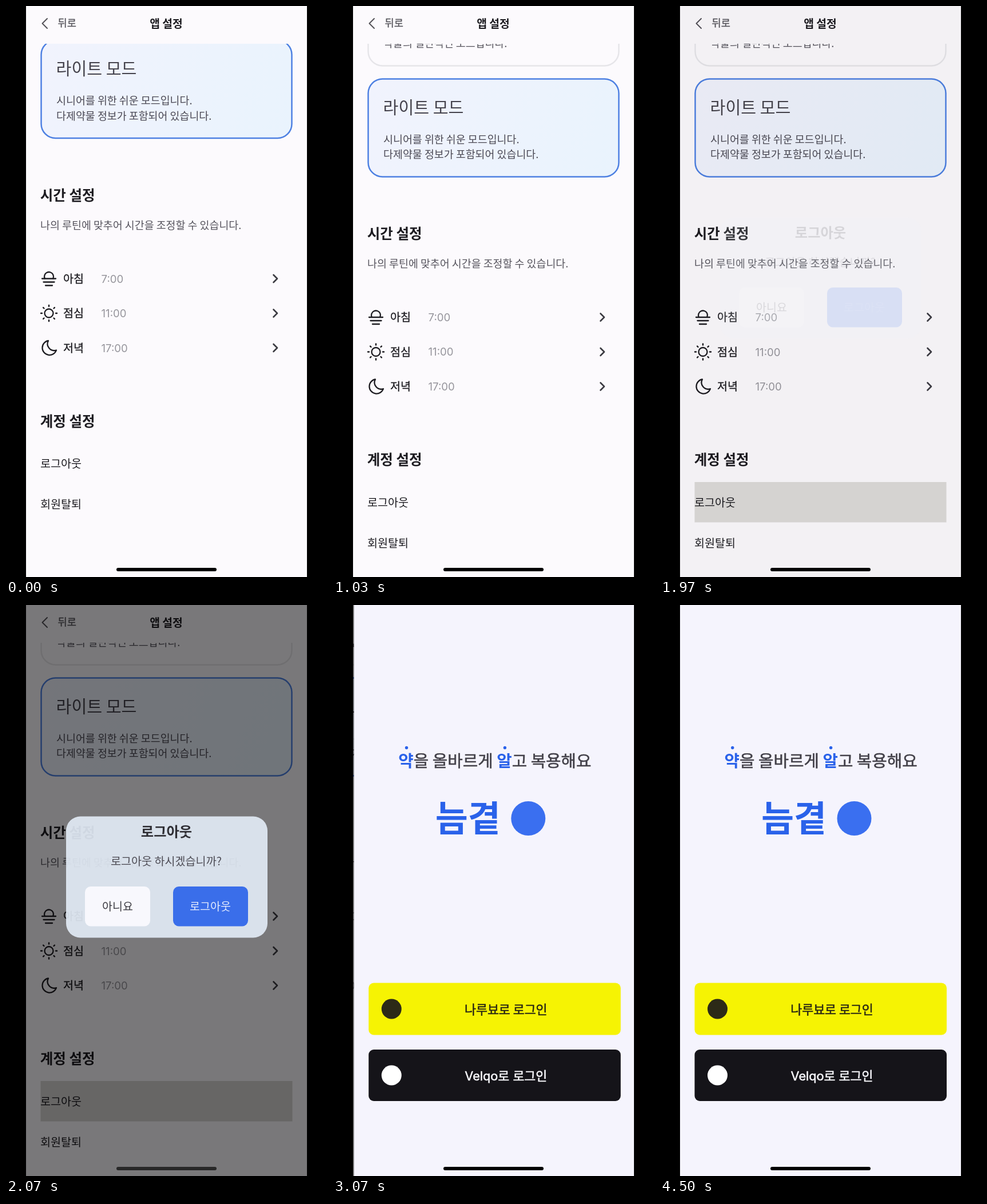
Write an HTML page with a canvas that moves like this. It is 561 by 998 pixels and loops after 5.06 s.

```html
<!DOCTYPE html>
<html lang="ko">
<head>
<meta charset="utf-8">
<title>앱 설정</title>
<style>
  html, body { margin: 0; width: 100%; height: 100%; overflow: hidden; background: #000; }
  canvas { display: block; width: 561px; height: 998px; }
</style>
</head>
<body>
<canvas id="stage"></canvas>
<script>
const W = 561, H = 998, LOOP = 5060;
const SCREEN = { x: 35, w: 491 };
const HEADER = 66;
const KO = '"Noto Sans CJK KR", "Noto Sans CJK", sans-serif';
const LATIN = 'Inter, ' + KO;
const INK = '#1d1c21', GREY = '#56545d', BLUE = '#2a62ea', PAPER = '#fcfafd';

const canvas = document.getElementById('stage');
const ctx = canvas.getContext('2d');
const ratio = window.devicePixelRatio || 1;
canvas.width = W * ratio;
canvas.height = H * ratio;

const clamp = v => Math.min(1, Math.max(0, v));
const span = (t, start, length) => clamp((t - start) / length);

// Cubic segment between two points, solved for y at a given x.
function bezierAt(x, p0, p1, p2, p3) {
  const at = (s, i) => {
    const r = 1 - s;
    return r * r * r * p0[i] + 3 * r * r * s * p1[i] + 3 * r * s * s * p2[i] + s * s * s * p3[i];
  };
  let lo = 0, hi = 1;
  for (let i = 0; i < 24; i++) {
    const mid = (lo + hi) / 2;
    if (at(mid, 0) < x) lo = mid; else hi = mid;
  }
  return at((lo + hi) / 2, 1);
}
const cubic = (a, b, c, d) => x =>
  x <= 0 ? 0 : x >= 1 ? 1 : bezierAt(x, [0, 0], [a, b], [c, d], [1, 1]);

const ease = cubic(0.25, 0.1, 0.25, 1);
const easeOut = cubic(0, 0, 0.58, 1);
const pushBack = cubic(0.35, 0.91, 0.33, 0.97);
function slideIn(x) {
  if (x <= 0 || x >= 1) return clamp(x);
  const mid = [0.198, 0.541];
  return x < mid[0]
    ? bezierAt(x, [0, 0], [0.056, 0.024], [0.108, 0.3085], mid)
    : bezierAt(x, mid, [0.3655, 1], [0.5465, 0.989], [1, 1]);
}

function box(x, y, w, h, r, fill, stroke, width) {
  ctx.beginPath();
  ctx.roundRect(x, y, w, h, r);
  if (fill) { ctx.fillStyle = fill; ctx.fill(); }
  if (stroke) { ctx.strokeStyle = stroke; ctx.lineWidth = width; ctx.stroke(); }
}

function disc(x, y, r, fill) {
  ctx.beginPath();
  ctx.arc(x, y, r, 0, Math.PI * 2);
  ctx.fillStyle = fill;
  ctx.fill();
}

function line(points, color, width) {
  ctx.beginPath();
  points.forEach(([x, y]) => ctx.lineTo(x, y));
  ctx.strokeStyle = color;
  ctx.lineWidth = width;
  ctx.stroke();
}

// y is the middle of the letters; extra thickens the strokes a little.
function text(str, x, y, size, color, { weight = 400, align = 'left', extra = 0, font = KO } = {}) {
  ctx.font = `${weight} ${size}px ${font}`;
  ctx.textAlign = align;
  ctx.fillStyle = color;
  const left = align === 'left' ? x - size * 0.05 : x;
  const base = y + size * 0.375;
  ctx.fillText(str, left, base);
  if (extra) {
    ctx.strokeStyle = color;
    ctx.lineWidth = extra;
    ctx.strokeText(str, left, base);
  }
  return ctx.measureText(str).width;
}

function sunriseIcon(x, y) {
  ctx.beginPath();
  ctx.arc(x, y - 3.5, 8, Math.PI * 0.86, Math.PI * 2.14);
  ctx.stroke();
  [[0, 12], [6, 9.5], [12, 6]].forEach(([dy, half]) =>
    line([[x - half, y + dy], [x + half, y + dy]], INK, 2.3));
}

function sunIcon(x, y) {
  ctx.beginPath();
  ctx.arc(x, y, 7.5, 0, Math.PI * 2);
  ctx.stroke();
  for (let i = 0; i < 8; i++) {
    const c = Math.cos(i * Math.PI / 4), s = Math.sin(i * Math.PI / 4);
    line([[x + c * 12, y + s * 12], [x + c * 14, y + s * 14]], INK, 2.4);
  }
}

function moonIcon(x, y) {
  ctx.save();
  ctx.translate(x, y);
  ctx.stroke(new Path2D('M-1 -12.5A12.6 12.6 0 1 0 13 4A11.6 11.6 0 0 1 -1 -12.5Z'));
  ctx.restore();
}

function timeRow(y, icon, name, time) {
  ctx.strokeStyle = INK;
  ctx.lineWidth = 2.3;
  icon(75, y);
  text(name, 101, y, 19.6, INK, { extra: 0.3 });
  ctx.font = `400 18.6px ${LATIN}`;
  ctx.textAlign = 'left';
  ctx.fillStyle = '#95949b';
  ctx.fillText(time, 166.5, y + 7);
  line([[467.5, y - 6.5], [474, y], [467.5, y + 6.5]], '#3c3b42', 2.6);
}

function settingsPage(scroll, press) {
  ctx.fillStyle = PAPER;
  ctx.fillRect(SCREEN.x, 0, SCREEN.w, H);

  ctx.save();
  ctx.beginPath();
  ctx.rect(SCREEN.x, HEADER, SCREEN.w, H - HEADER);
  ctx.clip();
  ctx.translate(0, -scroll);

  box(61.5, -67, 438, 171.5, 25, PAPER, '#e6e5e9', 2.4);
  text('약물의 일반적인 모드입니다.', 89, 65, 18.4, GREY);

  const tint = ctx.createLinearGradient(61, 127, 500, 299);
  tint.addColorStop(0, '#f1f3fd');
  tint.addColorStop(1, '#e9f3fd');
  box(61.5, 127.5, 438, 171, 25, tint, '#4d80e2', 2.5);
  text('라이트 모드', 89, 177, 29.2, '#45434c');
  text('시니어를 위한 쉬운 모드입니다.', 89, 233, 18.4, '#4b4954');
  text('다제약물 정보가 포함되어 있습니다.', 89, 259.5, 18.4, '#4b4954');

  text('시간 설정', 61, 398, 24.5, INK, { weight: 700 });
  text('나의 루틴에 맞추어 시간을 조정할 수 있습니다.', 61, 450.5, 18.4, GREY);
  timeRow(544, sunriseIcon, '아침', '7:00');
  timeRow(604.5, sunIcon, '점심', '11:00');
  timeRow(665, moonIcon, '저녁', '17:00');

  text('계정 설정', 61, 793, 24.5, INK, { weight: 700 });
  if (press > 0) {
    ctx.fillStyle = `rgba(188, 186, 180, ${0.58 * press})`;
    ctx.fillRect(60.5, 832, 440, 70.5);
  }
  text('로그아웃', 61, 867.5, 19.6, INK);
  text('회원탈퇴', 61, 938.5, 19.6, INK);
  ctx.restore();

  line([[72, 22], [63.5, 30.5], [72, 39]], '#56545b', 2);
  text('뒤로', 91.5, 29.5, 17.6, '#56545b', { extra: 0.3 });
  text('앱 설정', 280, 31, 19.3, INK, { weight: 700, align: 'center' });
}

function dialog(opacity, tap) {
  ctx.save();
  ctx.globalAlpha = opacity;
  box(105, 369.5, 352, 212, 25, '#e4edf8');
  text('로그아웃', 280.5, 396, 24.3, INK, { weight: 700, align: 'center' });
  text('로그아웃 하시겠습니까?', 280, 447.5, 19.6, '#3f3d46', { align: 'center' });
  if (tap > 0) {
    box(283, 486, 148, 81, 36, `rgba(190, 205, 220, ${0.22 * tap})`);
    disc(375, 518, 35 * tap, 'rgba(150, 175, 195, 0.3)');
  }
  box(138, 492, 114, 69.5, 10, '#fcfbff');
  box(292, 492, 131, 69.5, 10, '#2a63ea');
  text('아니요', 195, 527, 19.5, '#29282e', { align: 'center' });
  text('로그아웃', 357, 527, 19.5, '#f6f8ff', { align: 'center' });
  ctx.restore();
}

function slogan(x, y) {
  const size = 28.8;
  [['약', true], ['을 올바르게 '], ['알', true], ['고 복용해요']].forEach(([part, strong]) => {
    const width = text(part, x, y, size, strong ? BLUE : '#434149',
      strong ? { weight: 700 } : { extra: 0.6 });
    if (strong) disc(x + width / 2 - 0.5, 249.5, 2.7, BLUE);
    x += width;
  });
}

function loginButton(y, h, fill, mark, label, color, font) {
  box(60.5, y, 440.5, h, 9, fill);
  disc(100.5, y + h / 2, 17.5, mark);
  text(label, 300.5, y + h / 2 + 1, 21.7, color, { align: 'center', extra: 0.6, font });
}

function loginPage() {
  ctx.fillStyle = '#f5f4fd';
  ctx.fillRect(SCREEN.x, 0, SCREEN.w, H);
  slogan(114, 272);
  text('늠곁', 234, 373, 62, BLUE, { weight: 700, align: 'center' });
  disc(339.5, 373, 30, '#3a6ff0');
  loginButton(660.5, 91, '#f6f303', '#2c2a17', '나루뵤로 로그인', '#2a2814');
  loginButton(777, 90, '#151419', '#ffffff', 'Velqo로 로그인', '#f8f8fc', LATIN);
}

function draw(t) {
  ctx.setTransform(ratio, 0, 0, ratio, 0, 0);
  ctx.lineCap = ctx.lineJoin = 'round';
  ctx.fillStyle = '#000';
  ctx.fillRect(0, 0, W, H);

  ctx.save();
  ctx.beginPath();
  ctx.rect(SCREEN.x, 0, SCREEN.w, H);
  ctx.clip();

  // Overscroll settles like a critically damped spring.
  const u = Math.max(0, t - 15) * 0.016;
  const scroll = 67.5 * (1 + u) * Math.exp(-u);
  const press = span(t, 1860, 130) * (1 - span(t, 2080, 200));
  const fade = span(t, 1958, 150);
  const push = span(t, 2642, 500);
  const shade = 0.54 * ease(fade);

  if (push < 1) {
    ctx.save();
    ctx.translate(-SCREEN.w / 3 * pushBack(push), 0);
    settingsPage(scroll, press);
    ctx.restore();
    if (fade > 0) {
      ctx.fillStyle = `rgba(0, 0, 0, ${shade})`;
      ctx.fillRect(SCREEN.x, 0, SCREEN.w, H);
      dialog(easeOut(fade), span(t, 2550, 120));
    }
  }
  if (push > 0) {
    ctx.save();
    ctx.translate(SCREEN.w * (1 - slideIn(push)), 0);
    loginPage();
    ctx.restore();
  }

  const dimmed = shade / 0.54 * (1 - span(t, 2700, 200));
  const tone = Math.round(42 * dimmed);
  box(193, 982, 175, 6, 3, `rgb(${tone}, ${tone}, ${tone})`);
  ctx.restore();
}

let start;
function tick(now) {
  if (start === undefined) start = now;
  draw((now - start) % LOOP);
  requestAnimationFrame(tick);
}
draw(0);
requestAnimationFrame(tick);
</script>
</body>
</html>
```
